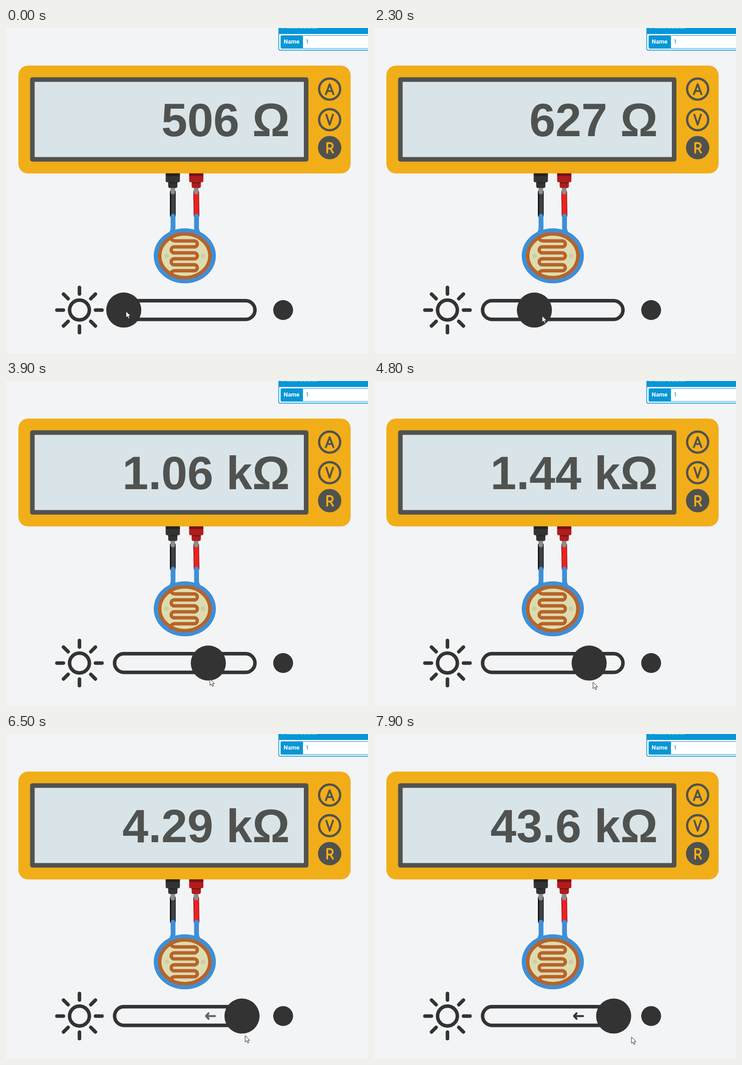
Animation, 790 px wide and 709 px high, one loop 8 s. Source, as an HTML page:

```html
<!DOCTYPE html>
<html lang="en">
<head>
<meta charset="utf-8">
<title>Light sensor and ohmmeter</title>
<style>
  html, body { margin: 0; width: 100%; height: 100%; overflow: hidden; background: #f3f4f6; }
  svg { display: block; width: 790px; height: 709px; }
  .line { fill: none; stroke-linecap: round; stroke-linejoin: round; }
  .panel { font: 13px Roboto, Arial, sans-serif; }
  .bold { font-weight: 700; fill: #fff; }
  .reading { font: bold 102px "Liberation Sans", Arial, sans-serif; fill: #505250; white-space: pre; }
</style>
</head>
<body>
<svg viewBox="0 0 790 709" xmlns="http://www.w3.org/2000/svg">
  <defs>
    <g id="plug">
      <path d="M348.500 317H379.500V333Q379.500 336.500 376 336.500H352Q348.500 336.500 348.500 333Z"/>
      <path d="M354 336H374V345Q374 349 370 349H358Q354 349 354 345Z"/>
      <path d="M348.500 317H379.500V323H348.500ZM354 336.500H374V339H354Z" fill="#000" fill-opacity=".3"/>
    </g>
  </defs>

  <g class="panel">
    <rect x="595.3" y="-20" width="230" height="68.4" rx="3" fill="#fff" stroke="#0696d7" stroke-width="1.6"/>
    <path d="M595 0H790V13H595Z" fill="#0696d7"/>
    <rect x="600" y="16.5" width="220" height="28" rx="2" fill="#fff" stroke="#0696d7"/>
    <path d="M648 16V45H602Q599.500 45 599.500 42.500V18.500Q599.500 16 602 16Z" fill="#0696d7"/>
    <text class="bold" x="602" y="1">Photoresistor</text>
    <text class="bold" x="606" y="34">Name</text>
    <text x="654" y="34" fill="#0a80b5">1</text>
  </g>

  <g>
    <rect x="27" y="82" width="725" height="235.3" rx="21" fill="#f2ae18"/>
    <rect x="57.5" y="112.500" width="597.5" height="174" fill="#d9e4e8"
      stroke="#505250" stroke-width="10" stroke-linejoin="round"/>
    <g class="line" stroke="#505250" stroke-width="5">
      <circle cx="706.3" cy="133.3" r="23"/>
      <circle cx="706.3" cy="200" r="23"/>
      <circle cx="706.3" cy="261" r="23" fill="#505250"/>
      <path stroke-width="4" d="M698 144.500L706.300 122.500L714.600 144.500M701 137.500H711.600M699 189L706.300 211L713.600 189"/>
      <path stroke="#f2ae18" stroke-width="4" d="M701 272V251H707a6 6 0 0 1 0 12H701M708 263L713.500 272"/>
    </g>
    <text id="value" class="reading" x="537.6" y="236" text-anchor="end"></text>
    <text class="reading" x="537.6" y="236">Ω</text>
  </g>

  <g class="line">
    <path d="M364 358V409" stroke="#000" stroke-width="12.5"/>
    <path d="M364.600 358V409" stroke="#3a4244" stroke-width="9"/>
    <path d="M415 358L415.800 409" stroke="#8f1717" stroke-width="12.5"/>
    <path d="M415 358L415.800 409" stroke="#ec2024" stroke-width="10"/>
    <path d="M364 345V358M415 345V358" stroke="#8c8c8c" stroke-width="10"/>
  </g>
  <use href="#plug" fill="#333"/>
  <use href="#plug" x="51.2" fill="#b01c1c"/>

  <g>
    <path class="line" d="M364.500 410.500V436Q364.500 443 360 449M415.800 410.500V436Q415.800 443 420 449"
      stroke="#3d8fd8" stroke-width="10.5"/>
    <ellipse cx="390.2" cy="497" rx="67.8" ry="60" fill="#3d8fd8"/>
    <ellipse cx="390.2" cy="497" rx="54.8" ry="47.7" fill="#dcdcae" stroke="#b8622a" stroke-width="7.6"/>
    <g fill="#d0cca8"><circle cx="350.5" cy="497" r="5"/><circle cx="430" cy="497" r="5"/></g>
    <path id="coil" class="line" stroke="#b8622a" stroke-width="7.5"/>
  </g>

  <g class="line" stroke="#333" stroke-width="7.7">
    <circle cx="160.3" cy="615.3" r="21.6"/>
    <g id="sun" transform="translate(160.3 615.3)"></g>
    <rect x="237" y="594.9" width="306.3" height="40.7" rx="20.35"/>
    <path id="arrow" stroke-width="4.3" d="M442 609.300L436.500 615.300L442 621.300M437 615.300H456.300"/>
  </g>
  <circle cx="604.8" cy="615.3" r="21.7" fill="#333"/>
  <circle id="knob" cy="615.3" r="38.3" fill="#333"/>
  <path id="cursor" d="M0 0V14L3.200 11.100L5.500 16.300L7.800 15.300L5.600 10.200H10Z"
    fill="#fff" stroke="#222" stroke-linejoin="round"/>
</svg>

<script>
const el = id => document.getElementById(id);
const LOOP = 8, FPS = 10;

// The drag, as a few key poses.
const POSES = [
  { t: 0,   knob: 257,   x: 262, y: 618, ohms: 506 },
  { t: 0.6, knob: 257,   x: 265, y: 618, ohms: 506 },
  { t: 1.1, knob: 286,   x: 295, y: 622, ohms: 518 },
  { t: 2.3, knob: 350,   x: 367, y: 628, ohms: 627 },
  { t: 3.9, knob: 441.5, x: 445, y: 650, ohms: 1060 },
  { t: 4.8, knob: 469.5, x: 478, y: 657, ohms: 1440 },
  { t: 6.5, knob: 515,   x: 522, y: 658, ohms: 4290 },
  { t: 7.9, knob: 523,   x: 562, y: 661, ohms: 43600 }
];

// Smooth curve over time through a value of every pose, without overshoot.
function track(valueOf) {
  const values = POSES.map(valueOf), last = POSES.length - 1;
  const slope = i => (values[i + 1] - values[i]) / (POSES[i + 1].t - POSES[i].t);
  const tangent = values.map((_, i) => {
    const before = slope(Math.max(i - 1, 0)), after = slope(Math.min(i, last - 1));
    return before * after <= 0 ? 0 : 2 * before * after / (before + after);
  });
  return t => {
    let i = 0;
    while (i < last - 1 && t > POSES[i + 1].t) i++;
    const span = POSES[i + 1].t - POSES[i].t, u = (t - POSES[i].t) / span, v = 1 - u;
    return values[i] * v * v * (1 + 2 * u) + values[i + 1] * u * u * (3 - 2 * u)
      + span * u * v * (tangent[i] * v - tangent[i + 1] * u);
  };
}

const knobX = track(pose => pose.knob);
const cursorX = track(pose => pose.x);
const cursorY = track(pose => pose.y);
const conductance = track(pose => 1 / pose.ohms);

function reading(ohms) {
  if (ohms < 999.5) return Math.round(ohms) + " ";
  return (ohms / 1000).toFixed(ohms < 9995 ? 2 : 1) + " k";
}

function drawCoil() {
  let d = "M359 456Q361 464.5 369 464.5";
  for (let row = 0; row < 5; row++) {
    const right = row % 2 === 0;
    d += `H${right ? 411 : 367}a6.5 6.5 0 0 ${right ? 1 : 0} 0 13`;
  }
  el("coil").setAttribute("d", d + "H369Q361 529.5 359 538");
}

function drawRays() {
  for (let angle = 0; angle < 360; angle += 45) {
    el("sun").innerHTML += `<path d="M35 0H49.2" transform="rotate(${angle})"/>`;
  }
}

function render(seconds) {
  const t = Math.floor(seconds % LOOP * FPS) / FPS;
  const x = knobX(t);
  el("knob").setAttribute("cx", x);
  el("arrow").setAttribute("opacity", Math.min(1, Math.max(0, (x - 490) / 33)));
  el("value").textContent = reading(1 / conductance(t));
  el("cursor").setAttribute("transform", `translate(${cursorX(t)} ${cursorY(t)})`);
}

drawCoil();
drawRays();
const start = performance.now();
function tick() {
  render((performance.now() - start) / 1000);
  requestAnimationFrame(tick);
}
tick();
</script>
</body>
</html>
```
